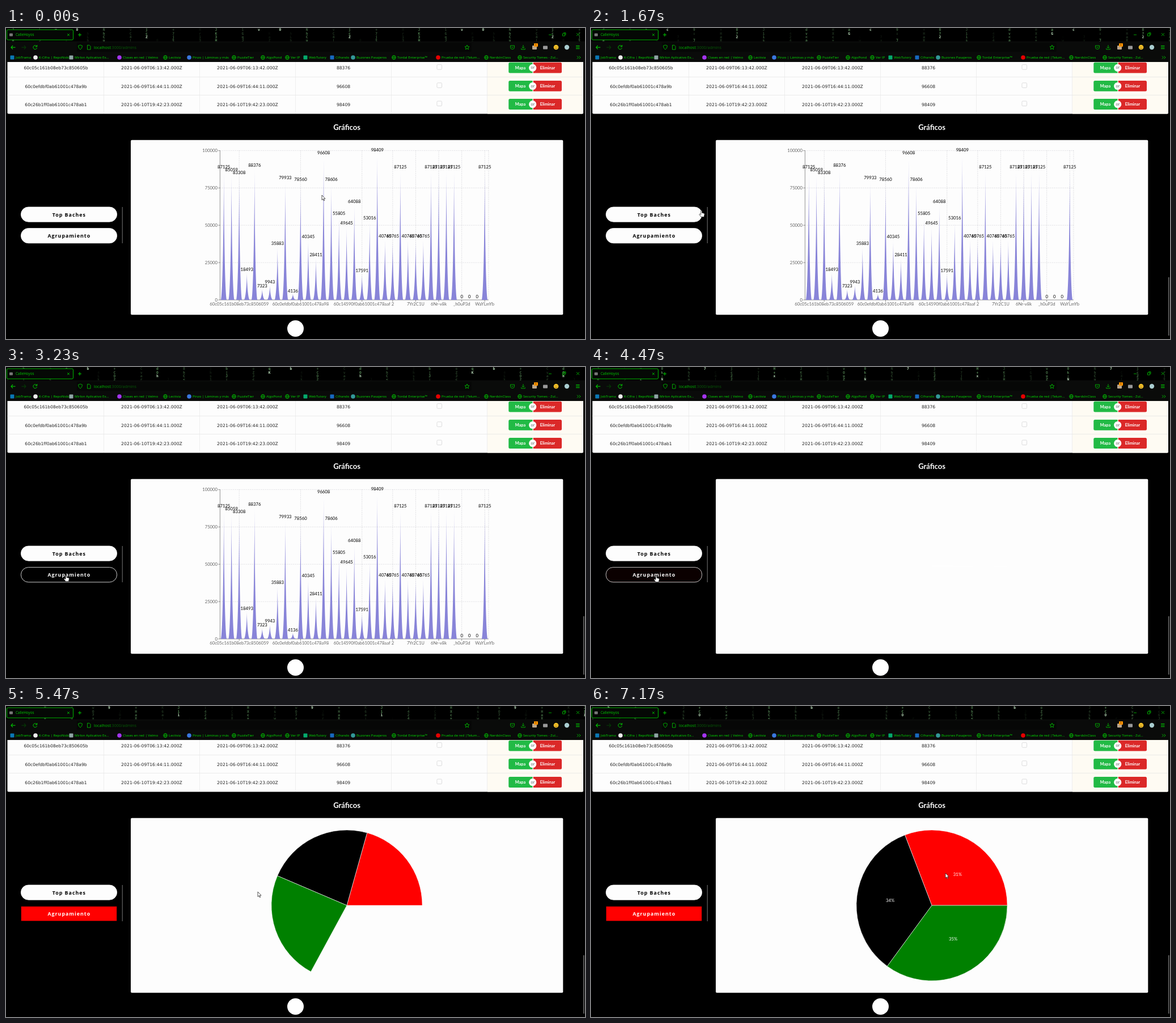
An HTML page with a canvas that plays this animation: 1021 px wide and 549 px high, repeating every 7.21 s.

```html
<!DOCTYPE html>
<html lang="es">
<head>
<meta charset="utf-8">
<style>
html, body { margin: 0; width: 100%; height: 100%; overflow: hidden; background: #000; }
canvas { display: block; }
</style>
</head>
<body>
<canvas id="stage" width="1021" height="549"></canvas>
<script>
const g = document.getElementById('stage').getContext('2d');
const LOOP = 7210, GREEN = '#0c0', PAPER = '#fdfdfd';
const LATO = 'Lato, sans-serif', OPEN = '"Open Sans", sans-serif',
      DEJAVU = '"DejaVu Sans", sans-serif', MONO = '"DejaVu Sans Mono", monospace';

// Bookmarks: icon centre, icon colour (none = globe), label, square icon
const bookmarks = [
  [11, '#0a78b5', 'JobTrama', 1], [52, '#eee', 'K-Cifra | RepoNido'],
  [115, '#8fa5a5', 'Mirlon Aplicativo Ex...', 1], [200, '#a435f0', 'Clases en red | Velmo'],
  [281, 0, 'Lectivia'], [323, '#3a78e0', 'Pinzo | Láminas y más'], [402, 0, 'PuzzleTier'],
  [453, 0, 'AlgoPond'], [496, 0, 'Ver IP'], [528, '#04aa6d', 'WebTutory', 1],
  [575, '#1769c0', 'Cifrando', 1], [612, '#399', 'Buzones Pasajeros'],
  [684, 0, 'Tordal Enterprise™'], [762, '#e60000', 'Prueba de red |Telum...'],
  [847, 0, 'NerdsInClass'], [906, 0, 'Security Tomes - Zul...']
];
const rows = [
  ['60c05c161b08eb73c850605b', '2021-06-09T06:13:42.000Z', '88376'],
  ['60c0efdbf0ab61001c478a9b', '2021-06-09T16:44:11.000Z', '96608'],
  ['60c26b1ff0ab61001c478ab1', '2021-06-10T19:42:23.000Z', '98409']
];
const values = [87125, 85059, 83308, 18493, 88376, 7323, 9943, 35883, 79933, 4136, 78560, 40345,
  28411, 96608, 78606, 55805, 49645, 64088, 17591, 53016, 98409, 40765, 40765, 87125, 40765,
  40765, 40765, 87125, 87125, 87125, 87125, 0, 0, 0, 87125];
const ticks = { 2: '60c05c161b08eb73c8506059', 10: '60c0efdbf0ab61001c478a98',
  18: '60c14590f0ab61001c478aaf', 22: '2', 25: '7Yr2C1U', 28: '6Nr-v8k', 31: '_h0uP3d', 34: 'WaYLmYb' };
const slices = [[31, '#f00', 110.9], [34, '#000', 122.9], [35, '#008000', 126.2]];
// Pointer path: time, x, y
const path = [[0, 557, 295], [100, 557, 295], [1000, 359, 307], [1700, 194, 322], [2120, 112, 328],
  [2280, 110, 343], [2370, 109, 360], [3230, 106, 367], [4470, 115, 368], [4750, 122, 367],
  [5470, 444, 328], [7170, 625, 295]];

const clamp = v => Math.min(1, Math.max(0, v));
const mix = (a, b, p) => a + (b - a) * p;
const rnd = n => { const v = Math.sin(n * 127.1 + 3.7) * 43758.5453; return v - Math.floor(v); };

// CSS "ease" curve
function ease(x) {
  x = clamp(x);
  let lo = 0, hi = 1, u = x;
  for (let i = 0; i < 20; i++) {
    u = (lo + hi) / 2;
    const bx = .75 * u * (1 - u) + u * u * u;
    if (bx < x) lo = u; else hi = u;
  }
  return .3 * u * (1 - u) * (1 - u) + 3 * u * u * (1 - u) + u * u * u;
}

function text(s, x, y, size, color, family, align = 'center', weight = 400, spacing = 0) {
  g.font = `${weight} ${size}px ${family}`;
  g.letterSpacing = spacing + 'px';
  g.textAlign = align;
  g.fillStyle = color;
  g.fillText(s, x, y + size * .36);
}
function box(x, y, w, h, fill, r = 0, stroke, lw = 1) {
  g.beginPath();
  g.roundRect(x, y, w, h, r);
  if (fill) { g.fillStyle = fill; g.fill(); }
  if (stroke) { g.strokeStyle = stroke; g.lineWidth = lw; g.stroke(); }
}
function disc(x, y, r, fill) {
  g.beginPath();
  g.arc(x, y, r, 0, 7);
  g.fillStyle = fill;
  g.fill();
}
function line(color, lw, ...p) {
  g.beginPath();
  for (let i = 0; i < p.length; i += 2) g.lineTo(p[i], p[i + 1]);
  g.strokeStyle = color;
  g.lineWidth = lw;
  g.stroke();
}
function outline(d, fill, stroke, lw = .8) {
  const p = new Path2D(d);
  if (fill) { g.fillStyle = fill; g.fill(p); }
  g.strokeStyle = stroke;
  g.lineWidth = lw;
  g.stroke(p);
}

function rain(t) {
  const glyphs = '0123456789abcdefghjkqrstuvwxzCGHJKLNOVXZ:;+<|_';
  for (let c = 0; c < 38; c++) {
    const head = (t / 70 + (c * .618 % 1) * 60) % 60;
    for (let r = 0; r < 4; r++) {
      const age = head - r;
      if (age < 0 || age > 14) continue;
      const ch = glyphs[Math.floor(rnd(c * 9 + r + 50) * glyphs.length)];
      const color = age < 1 ? '#bdb' : `rgba(95,150,95,${1 - age / 15})`;
      for (let k = -1; k < 3; k++)
        text(ch, 125.5 + 358 * k + 9.42 * c, 3 + 6.3 * r, 6.3, color, MONO, 'center', 700);
    }
  }
}

function browser(t) {
  rain(t);
  box(0, 23.5, 1021, 36.5, '#0a0b0a');
  box(125, 26, 696, 16, '#060706', 2);
  box(1.5, 3, 117, 18, '#050805', 2, GREEN, .9);
  box(6, 9.5, 6, 5, '#777', 1);
  text('CalleHoyos', 17, 12.2, 6.3, GREEN, OPEN, 'left');
  line(GREEN, .8, 108, 10, 112, 14); line(GREEN, .8, 112, 10, 108, 14);
  line(GREEN, 1, 127, 12, 133, 12); line(GREEN, 1, 130, 9, 130, 15);
  line(GREEN, .8, 957, 12, 962, 12);
  box(981.5, 10, 4, 4, null, 0, GREEN, .8); line(GREEN, .8, 983, 8.5, 987, 8.5, 987, 12.5);
  line(GREEN, .8, 1006, 9, 1011, 14); line(GREEN, .8, 1011, 9, 1006, 14);

  line(GREEN, 1.1, 12, 31, 9, 34.2, 12, 37.4); line(GREEN, 1.1, 9, 34.2, 16.5, 34.2);
  line('#053c05', 1.1, 32, 31, 35, 34.2, 32, 37.4); line('#053c05', 1.1, 35, 34.2, 27.5, 34.2);
  outline('M54 32A3.4 3.4 0 1 0 54.6 35.2M54.8 30V33H51.8', null, GREEN, 1);
  outline('M131 30L134.5 31.3Q134.5 36 131 38Q127.5 36 127.5 31.3Z', null, GREEN);
  outline('M143.5 30.3H147L149 32.3V38H143.5Z', null, GREEN);
  text('localhost', 155, 34.2, 7.1, '#0b0', OPEN, 'left');
  const w = g.measureText('localhost').width;
  text(':3000/admins', 155 + w, 34.2, 7.1, '#075807', OPEN, 'left');
  outline('M813 30L814.1 32.8L817 33L814.8 34.9L815.5 37.8L813 36.2L810.5 37.8L811.2 34.9L809 33L811.9 32.8Z', null, GREEN);
  outline('M889.5 31H896.5V34A3.5 3.5 0 0 1 889.5 34ZM891.3 33L893 34.8L894.7 33', null, GREEN);
  outline('M912 30V35.5M909.7 33.3L912 35.6L914.3 33.3M908.7 35.8V37.8H915.3V35.8', null, GREEN);
  box(928, 31, 8, 7, '#b9a58c', 1);
  box(931, 27, 7, 6, '#ff9500', 1);
  text('1', 934.5, 30, 5, '#000', OPEN);
  box(947, 31.5, 8, 6, '#999', 1);
  disc(970, 34, 4.3, '#ffc928');
  disc(968.4, 32.8, .6, '#432'); disc(971.6, 32.8, .6, '#432');
  outline('M967.6 35Q970 38 972.4 35', null, '#432', .7);
  disc(989, 34, 4.2, '#a9cdd0');
  for (const y of [31.5, 34, 36.5]) line(GREEN, 1, 1005, y, 1011.5, y);

  for (const [x, color, label, square] of bookmarks) {
    if (!color) {
      g.beginPath(); g.arc(x, 52, 3.5, 0, 7);
      g.moveTo(x + 1.6, 52); g.ellipse(x, 52, 1.6, 3.5, 0, 0, 7);
      g.moveTo(x - 3.5, 52); g.lineTo(x + 3.5, 52);
      g.strokeStyle = GREEN; g.lineWidth = .7; g.stroke();
    } else if (square) box(x - 3.5, 48.5, 7, 7, color, 1);
    else disc(x, 52, 3.8, color);
    text(label, x + 6, 52.2, 6.1, '#00e000', OPEN, 'left');
  }
  line(GREEN, .9, 1007, 49.5, 1009.5, 52, 1007, 54.5);
  line(GREEN, .9, 1010.5, 49.5, 1013, 52, 1010.5, 54.5);
}

function table() {
  box(2.5, 60, 1015.5, 91.5, PAPER, [0, 0, 2, 2]);
  box(849, 60, 169, 91.5, '#fefbf3', [0, 0, 2, 0]);
  for (const x of [172.5, 341.5, 510.5, 679.5, 848.5]) line('#e8e8e8', .7, x, 60, x, 151);
  for (const y of [86.5, 118.5]) line('#e4e4e4', .7, 2.5, y, 1018, y);
  rows.forEach(([id, date, n], i) => {
    const y = 70.7 + 32.2 * i;
    text(id, 88, y, 7.55, '#222', DEJAVU);
    text(date, 257, y, 7.6, '#222', DEJAVU, 'center', 400, .12);
    text(date, 426, y, 7.6, '#222', DEJAVU, 'center', 400, .12);
    text(n, 595, y, 7.6, '#222', DEJAVU);
    box(760, y - 6, 8.5, 8.5, '#fff', 1.5, '#d4d4d5', .8);
    const top = y - 10;
    box(886.3, top, 42.2, 18.8, '#21ba45', [2.5, 0, 0, 2.5]);
    box(929.8, top, 50.2, 18.8, '#db2828', [0, 2.5, 2.5, 0]);
    disc(928.7, y - .4, 6.6, '#fff');
    text('Mapa', 907, y - .4, 7.3, '#fff', LATO, 'center', 700);
    text('or', 928.7, y - .8, 7, '#8a8a8a', LATO, 'center', 700);
    text('Eliminar', 955, y - .4, 7.3, '#fff', LATO, 'center', 700);
  });
}

function bars() {
  const left = 377.4, right = 851, top = 216.4, base = 480, step = (right - left) / values.length;
  const midX = i => left + step * (+i + .5);
  const yOf = v => base - (base - top) * v / 100000;
  g.setLineDash([1.65, 1.65]);
  for (let v = 25000; v <= 100000; v += 25000) line('#c4c4cc', .6, left, yOf(v), right, yOf(v));
  for (const i in ticks) line('#c4c4cc', .6, midX(i), top, midX(i), base);
  line('#c4c4cc', .6, right, top, right, base);
  g.setLineDash([]);
  line('#666', .7, left, top, left, base, right, base);
  for (let v = 0; v <= 100000; v += 25000) {
    line('#666', .7, left - 3.3, yOf(v), left, yOf(v));
    text(v, left - 4.4, yOf(v), 7.7, '#666', LATO, 'right');
  }
  for (const i in ticks) {
    line('#666', .7, midX(i), base, midX(i), base + 3.3);
    text(ticks[i], midX(i), 487, 7.7, '#666', LATO);
  }
  const w = step * .8;
  values.forEach((v, i) => {
    const x = midX(i) - w / 2, y = yOf(v), third = y + (base - y) / 3;
    g.beginPath();
    g.moveTo(x, base);
    g.bezierCurveTo(x + w / 3, base, x + w / 2, third, x + w / 2, y);
    g.bezierCurveTo(x + w / 2, third, x + w * 2 / 3, base, x + w, base);
    g.fillStyle = '#8884d8';
    g.fill();
  });
  values.forEach((v, i) => text(v, midX(i), yOf(v) - 5.3, 7.7, '#000', LATO));
}

function pie(t) {
  const p = ease((t - 4883) / 1500), cx = 601, cy = 352, r = 133.1, rad = Math.PI / 180;
  if (!p) return;
  let a = 0;
  for (const [pct, color, span] of slices) {
    const b = a + span * p;
    g.beginPath();
    g.moveTo(cx, cy);
    g.arc(cx, cy, r, -a * rad, -b * rad, true);
    g.closePath();
    g.fillStyle = color; g.fill();
    g.strokeStyle = '#fff'; g.lineWidth = .6; g.stroke();
    if (t >= 6383) {
      const m = (a + b) / 2 * rad, x = cx + r / 2 * Math.cos(m);
      text(pct + '%', x, cy - r / 2 * Math.sin(m), 7.7, '#fff', LATO, x > cx ? 'left' : 'right');
    }
    a = b;
  }
}

// dark: hover amount, red: focus amount
function button(label, y, dark, red = 0) {
  const v = mix(253, 0, dark), ink = mix(0, 255, dark), edge = mix(255, 0, red);
  box(26.4, y + .4, 169.2, 26.2, `rgb(${mix(v, 255, red)},${mix(v, 0, red)},${mix(v, 0, red)})`,
    13.1 * (1 - red), `rgb(${edge},${edge},${edge})`, .8);
  text(label, 111.3, y + 14, 8.9, `rgb(${ink},${ink},${ink})`, OPEN, 'center', 700, 1);
}

function pointer(t) {
  let i = 0;
  while (i < path.length - 2 && t >= path[i + 1][0]) i++;
  const [a, b] = [path[i], path[i + 1]];
  const u = clamp((t - a[0]) / (b[0] - a[0])), p = u * u * (3 - 2 * u);
  const x = mix(a[1], b[1], p), y = mix(a[2], b[2], p);
  const over = x > 26 && x < 196 && ((y > 315 && y < 343) || (y > 353 && y < 380));
  g.save();
  g.translate(x, y);
  if (over) outline('M-1 6V1Q0 -.6 1 1V4.4L4.6 5.3Q5.6 5.7 5.3 7.2L4.4 11.6H-.8L-3.8 7.4Q-3.6 5.8 -2.2 6.4L-1 7.5Z', '#fff', '#111', .7);
  else outline('M0 0V8.6L2 6.8L3.4 10L4.7 9.4L3.3 6.3H6Z', '#fff', '#111', .7);
  g.restore();
}

function draw(t) {
  g.fillStyle = '#000';
  g.fillRect(0, 0, 1021, 549);
  browser(t);
  table();
  text('Gráficos', 601, 175, 13, '#fff', LATO, 'center', 700);
  box(220, 197.7, 762.3, 308.6, PAPER, 2);
  if (t < 4440) bars(); else pie(t);

  const topIn = ease((t - 1700) / 500), topOut = ease((t - 2280) / 500);
  button('Top Baches', 315.6, topIn * (1 - topOut));
  button('Agrupamiento', 353.2, ease((t - 2350) / 500), ease((t - 4440) / 500));
  line('#777', 1, 205.2, 316, 205.2, 380);
  disc(510.5, 530.5, 14.5, '#fff');
  if (t >= 100) line('#777', 1.4, 1018.8, 440, 1018.8, 543);
  pointer(t);
}

function frame() {
  draw(performance.now() % LOOP);
  requestAnimationFrame(frame);
}
frame();
</script>
</body>
</html>
```
